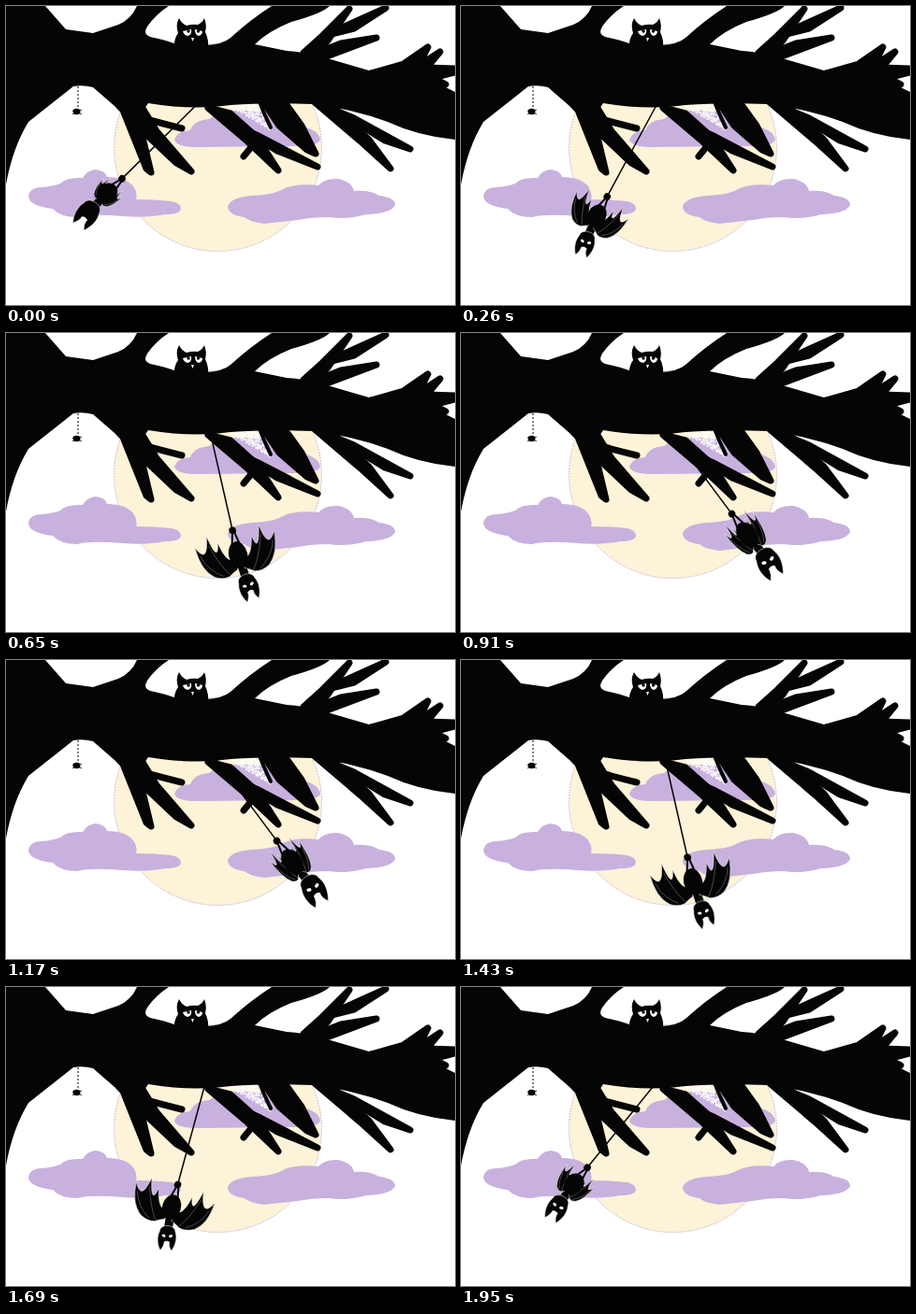
Write an HTML page that moves like this. It is 480x320 px and loops after 2.08 s.

```html
<!DOCTYPE html>
<html lang="en">
<head>
<meta charset="utf-8">
<title>Bat on a string</title>
<style>
  html, body { margin: 0; width: 100%; height: 100%; overflow: hidden; background: #fff; }
  svg { display: block; width: 480px; height: 320px; }
  .cloud { fill: #c8b1de; }
  .limbs path { stroke: #050505; stroke-width: 7; stroke-linejoin: round; }
  .twigs { fill: none; stroke: #050505; stroke-linecap: round; }
  .rib { fill: none; stroke: #666; stroke-width: .7; vector-effect: non-scaling-stroke; }
  .edge { stroke: #fff; stroke-width: .5; vector-effect: non-scaling-stroke; }
</style>
</head>
<body>
<svg viewBox="0 0 480 320" fill="#050505">
  <circle cx="226.500" cy="151.500" r="111" fill="#fdf3d8" stroke="#b9a3cf" stroke-width=".7" stroke-dasharray="2 1"/>

  <g class="cloud">
    <path d="M24 204Q25 194 38 194Q50 193 58 190Q64 183 82 184Q86 176 96 175Q106 176 108 183Q128 183 136 193Q141 200 139 207Q160 207 177 209Q187 211 187 217Q186 223 170 223Q150 227 125 225Q90 222 76 226Q58 226 50 217Q25 214 24 204Z"/>
    <path d="M237 215Q239 205 262 203Q285 202 294 197Q308 189 334 192Q341 184 355 185Q370 188 372 198Q390 197 399 203Q416 205 416 213Q412 222 385 223Q365 229 345 226Q326 226 312 229Q294 231 276 233Q260 231 255 226Q238 224 237 215Z"/>
    <path d="M180 143Q183 134 197 133Q201 122 217 121Q230 110 260 112Q290 113 303 126Q334 130 336 143Q334 150 312 150L205 151Q182 151 180 143Z"/>
  </g>

  <path id="web" stroke="#fff" stroke-width="1.200"/>

  <!-- trunk -->
  <path d="M0 0H42L64 25L93 29L120 20Q134 14 140 0H174Q160 9 151 22Q146 30 154 33Q170 36 182 41L213 42Q232 41 240 34Q262 14 284 0H346Q338 8 305 17Q280 27 266 41L300 48Q318 49 340 55L388 69Q410 64 428 66L480 92V143Q440 139 408 124Q370 110 328 105Q280 103 240 106Q200 112 152 104L136 128L116 107L93 87Q82 84 72 86L24 124Q7 152 0 191Z"/>

  <g class="limbs">
    <path d="M318 50L338 32L367 3L344 37L330 53Z"/>
    <path d="M325 53L358 40L396 34L335 57Z"/>
    <path d="M340 32L375 16L406 2L372 24Z"/>
    <path d="M390 72L425 62L451 44L441 64L464 49L450 66L480 67V71L456 77L470 84L440 96Z"/>
    <path d="M128 106L144 106L161 134L198 177L182 168L146 134Z"/>
    <path d="M126 114L144 132L155 178L150 174Z"/>
    <path d="M216 109L240 115L268 140L291 176L256 143Z"/>
    <path d="M250 130L272 140L333 172L290 155Z"/>
    <path d="M274 101L298 103L316 128L331 158L322 154L292 128Z"/>
    <path d="M330 103L352 110L388 143L411 174L378 144Z"/>
    <path d="M355 113L372 120L432 153L405 144Z"/>
  </g>
  <g class="twigs">
    <path stroke-width="7" d="M146 120Q168 126 188 131M134 106L145 110M263 150L254 161"/>
    <path stroke-width="4" d="M270 100Q276 116 283 130"/>
  </g>

  <!-- owl -->
  <path d="M179 46Q180 34 184 29Q181 20 185 13Q188 19 193 21Q200 19 205 20Q210 18 212 13Q215 21 213 28Q217 36 216 46Z"/>
  <path fill="#fff" d="M189 27L198 25Q199 31 194 32Q190 31 189 27ZM202 25L210 27Q210 31 206 32Q202 31 202 25ZM198 34H201L199.500 38Z"/>
  <circle cx="195" cy="27" r="1.700"/>
  <circle cx="205.500" cy="27" r="1.700"/>

  <!-- spider -->
  <path d="M77 86V110" stroke="#050505" stroke-dasharray="2 2"/>
  <path d="M71 112L75 113L81 111M71 116L75 113L81 116" fill="none" stroke="#050505" stroke-width=".8"/>
  <ellipse cx="75.500" cy="113" rx="4" ry="3.300"/>

  <g id="bat">
    <path id="string" stroke="#050505" stroke-width="1.500"/>
    <circle r="3.800"/>
    <path d="M0 0L-4 15M1 0L4 15" stroke="#050505" stroke-width="2"/>
    <path id="neck" stroke="#050505" stroke-width="9"/>
    <g id="wings">
      <g id="wing">
        <path class="edge" d="M4 2Q15 6 20 -21Q24 4 31 -31Q36 2 47 -21Q46 6 32 17Q23 22 15 20Q9 16 4 14Z"/>
        <path class="rib" d="M14 18Q24 4 31 -20M22 18Q38 8 43 -10"/>
      </g>
      <use href="#wing" transform="scale(-1 1)"/>
    </g>
    <ellipse id="body" rx="10"/>
    <g id="head">
      <path class="edge" d="M-9 -3C-9 -12 9 -12 9 -3C12 4 10 12 6 19Q2 14 3 9Q0 7 -3 9Q-3 14 -7 19C-11 12 -12 4 -9 -3Z"/>
      <g id="eyes" fill="#fff">
        <ellipse cx="-4" cy="2" rx="2.200" ry="1.500" transform="rotate(20 -4 2)"/>
        <ellipse cx="4" cy="2" rx="2.200" ry="1.500" transform="rotate(-20 4 2)"/>
      </g>
    </g>
  </g>
</svg>
<script>
  const $ = id => document.getElementById(id);
  const set = (id, name, value) => $(id).setAttribute(name, value);

  const STEP = 130, STEPS = 16, PIVOT = [215.5, 94];

  // cobweb: seeded white specks in the triangle between two boughs
  function drawWeb() {
    let seed = 7, d = '';
    const random = () => (seed = seed * 16807 % 2147483647) / 2147483647;
    for (let i = 0; i < 330; i++) {
      const down = Math.sqrt(random()), across = random();
      const x = 270 + down * (12 * across - 32 * (1 - across));
      const y = 103 + down * (30 * across + 4 * (1 - across));
      d += `M${x.toFixed(1)} ${y.toFixed(1)}h1.2`;
    }
    set('web', 'd', d);
  }

  // p runs from 0 (far left) to 1 (far right); the bat opens its wings in the middle
  function pose(p) {
    const c = Math.cos(Math.PI * p), s = Math.sin(Math.PI * p);
    const angle = 1.2 + 44 * c - 8 * s * c;
    const length = 120 + 2 * c + 7 * c * c;
    const headX = 3.5 * s, headY = 54.5 - 6 * c + 2 * s;
    const tilt = 3 + 31 * c - 12 * s;
    const size = 1.2 - 0.1 * c - 0.25 * s;
    const spread = 0.3 + 0.73 * s * s;
    const reach = 0.5 + 0.25 * p + 0.3 * s;
    const mid = headY * 0.46;

    set('bat', 'transform', `translate(${PIVOT}) rotate(${angle}) translate(0 ${length})`);
    set('string', 'd', `M0 ${-length}V0`);
    set('neck', 'd', `M0 ${mid}L${headX} ${headY}`);
    set('wings', 'transform', `translate(0 ${mid + 2}) scale(${spread} ${reach})`);
    set('body', 'cy', mid);
    set('body', 'ry', headY * 0.25);
    set('head', 'transform', `translate(${headX} ${headY}) rotate(${tilt - angle}) scale(${size})`);
    set('eyes', 'opacity', p > 0 ? 1 : 0);
  }

  function tick() {
    const k = Math.floor(performance.now() / STEP) % STEPS;
    pose(1 - Math.abs(2 * k / STEPS - 1));
    requestAnimationFrame(tick);
  }

  drawWeb();
  tick();
</script>
</body>
</html>
```
